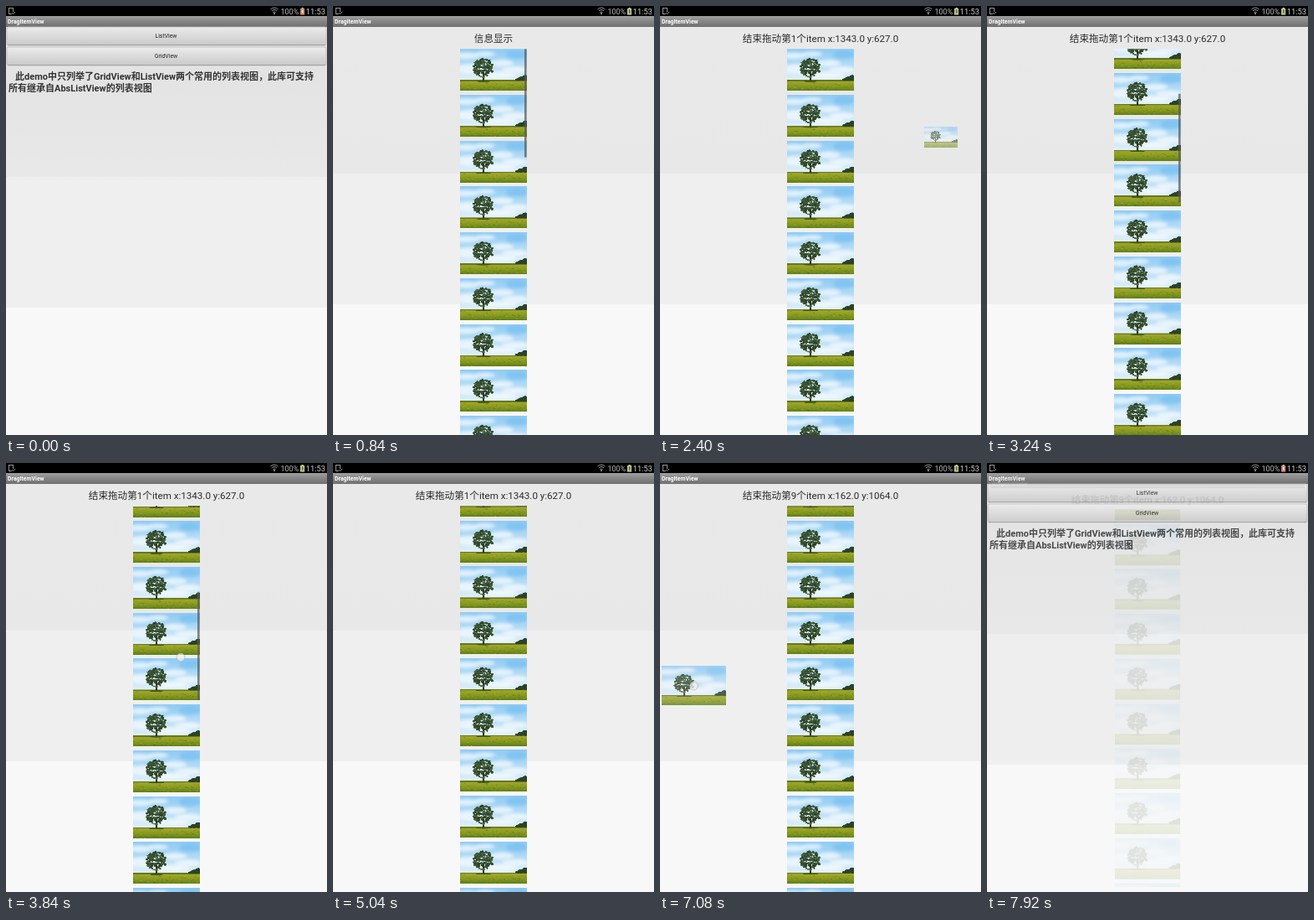
Recreate the animation shown at these times as an HTML page with a canvas. Size 384x512 px, loop 8 s.

```html
<!DOCTYPE html>
<html lang="zh-CN">
<head>
<meta charset="utf-8">
<style>
  html, body { margin: 0; width: 100%; height: 100%; overflow: hidden; background: #000; }
  canvas { display: block; width: 384px; height: 512px; }
</style>
</head>
<body>
<canvas id="stage" width="384" height="512"></canvas>
<script>
const W = 384, H = 512, LOOP = 8000, STEP = 120;
const FONT = 'Roboto, "Noto Sans CJK SC", "Noto Sans CJK", sans-serif';
const ITEM = { x: 152, w: 80, h: 50, pitch: 54.72, count: 30 };
const LIST_TOP = 51.3, LIST_H = H - LIST_TOP;
const ctx = document.getElementById('stage').getContext('2d');

const clamp = v => Math.min(1, Math.max(0, v));
const progress = (t, a, b) => clamp((t - a) / (b - a));
const ease = p => 0.5 - Math.cos(p * Math.PI) / 2;
const mix = (a, b, p) => a + (b - a) * p;

// Eased value along [time, value] pairs
function track(t, keys) {
  for (let i = 1; i < keys.length; i++) {
    const [t0, v0] = keys[i - 1], [t1, v1] = keys[i];
    if (t < t1) return mix(v0, v1, ease(progress(t, t0, t1)));
  }
  return keys[keys.length - 1][1];
}

function makeLayer(w, h, scale = 1) {
  const canvas = document.createElement('canvas');
  canvas.width = w * scale;
  canvas.height = h * scale;
  const c = canvas.getContext('2d');
  c.scale(scale, scale);
  return c;
}

function box(c, x, y, w, h, fill) {
  c.fillStyle = fill;
  c.fillRect(x, y, w, h);
}

function gradient(c, y0, y1, ...colors) {
  const g = c.createLinearGradient(0, y0, 0, y1);
  colors.forEach((color, i) => g.addColorStop(i / (colors.length - 1), color));
  return g;
}

function ellipse(c, x, y, rx, ry, fill) {
  c.fillStyle = fill;
  c.beginPath();
  c.ellipse(x, y, rx, ry, 0, 0, Math.PI * 2);
  c.fill();
}

function text(c, str, x, y, size, color, align = 'left', weight = 400) {
  c.font = `${weight} ${size}px ${FONT}`;
  c.fillStyle = color;
  c.textAlign = align;
  c.fillText(str, x, y);
}

function makePhoto() {
  const c = makeLayer(ITEM.w, ITEM.h, 4);
  let seed = 11;
  const rnd = () => (seed = seed * 16807 % 2147483647) / 2147483647;

  box(c, 0, 0, 80, 50, gradient(c, 0, 38, '#8ecbf4', '#b5dcf6', '#e3f1f8'));
  c.filter = 'blur(8px)';
  [[8, 8, 15, 4], [30, 6, 12, 3], [12, 24, 18, 6], [50, 17, 14, 4],
   [66, 25, 16, 4], [46, 31, 22, 4]].forEach(b => ellipse(c, ...b, 'rgba(246,251,255,.75)'));
  ellipse(c, 68, 7, 13, 5, 'rgba(105,183,240,.5)');
  c.filter = 'none';

  box(c, 0, 37, 80, 2, '#66781f');
  box(c, 0, 38.5, 80, 11.5, gradient(c, 38.5, 50, '#a3a72c', '#889a20', '#60801a'));
  for (let i = 0; i < 90; i++) {
    box(c, rnd() * 80, 39 + rnd() * 11, 2, 0.6, i % 2 ? 'rgba(180,180,40,.35)' : 'rgba(55,90,10,.3)');
  }
  [[69, 36.5, 3, 1.5], [73, 35.5, 4, 2.5], [78, 34.5, 4, 3.5]]
    .forEach(b => ellipse(c, ...b, '#2c4228'));

  box(c, 27, 26, 1.8, 13, '#30301c');
  ellipse(c, 28, 38.6, 9, 0.8, '#45581a');
  for (let i = 0; i < 130; i++) {
    const a = rnd() * Math.PI * 2, r = Math.sqrt(rnd());
    ellipse(c, 28 + Math.cos(a) * r * 12, 22.5 + Math.sin(a) * r * 11,
      0.8 + rnd() * 1.3, 0.7 + rnd() * 1, ['#2d432b', '#39502f', '#4a6038'][i % 3]);
  }
  return c.canvas;
}

const photo = makePhoto();
const listLayer = makeLayer(W, H);

const drags = [
  { n: 1, start: 1400, move: 2160, drop: 2250, from: [192, 76.5], to: [335.75, 156.75] },
  { n: 9, start: 5820, move: 6900, drop: 7040, from: [192, 148.5], to: [40.5, 266] }
];
const FINGER_SCROLLS = [[2740, 3080, 430, 260], [3320, 3800, 400, 232]];

function scrollAt(t) {
  return track(t, [[2740, 0], [3080, 170], [3320, 197], [3800, 365], [4300, 365.6]]);
}

function dragPoint(d, t) {
  const p = ease(progress(t, d.start, d.move));
  return d.from.map((v, i) => mix(v, d.to[i], p));
}

function message(t) {
  const d = drags.filter(d => t >= d.start).pop();
  if (!d) return '信息显示';
  const [x, y] = dragPoint(d, t).map(v => Math.round(v * 4).toFixed(1));
  return `${t < d.drop ? '正在' : '结束'}拖动第${d.n}个item x:${x} y:${y}`;
}

function titleBar(c) {
  box(c, 0, 12, W, 13, gradient(c, 12, 25, '#a0a0a0', '#858585', '#707070'));
  text(c, 'DragItemView', 2, 21, 6.9, '#fff', 'left', 700);
}

function background(c, first, second, top) {
  box(c, 0, 0, W, first, gradient(c, 24, first, top, '#e8e8e8'));
  box(c, 0, first, W, second - first, '#efefef');
  box(c, 0, second, W, H - second, '#f8f8f8');
}

function button(c, label, y) {
  c.beginPath();
  c.roundRect(1, y, 382, 22, 2);
  c.fillStyle = gradient(c, y, y + 22, '#ececec', '#dadada', '#c9c9c9');
  c.fill();
  c.strokeStyle = '#bcbcbc';
  c.lineWidth = 0.8;
  c.stroke();
  box(c, 2, y + 21, 380, 1, '#a2a2a2');
  text(c, label, 191.5, y + 13.3, 6.9, '#222', 'center');
}

function drawMain(c) {
  background(c, 204, 360, '#e1e1e1');
  titleBar(c);
  button(c, 'ListView', 25);
  button(c, 'GridView', 49);
  text(c, '此demo中只列举了GridView和ListView两个常用的列表视图，此库可支持', 11, 88, 11, '#333', 'left', 700);
  text(c, '所有继承自AbsListView的列表视图', 3, 102, 11, '#333', 'left', 700);
}

function drawList(c, t) {
  background(c, 200, 356, '#e9e9e9');
  titleBar(c);
  text(c, message(t), 192, 42.5, 11.6, '#2b2b2b', 'center');

  const scroll = scrollAt(t);
  c.save();
  c.beginPath();
  c.rect(0, LIST_TOP, W, LIST_H);
  c.clip();
  for (let i = 0; i < ITEM.count; i++) {
    const y = LIST_TOP + i * ITEM.pitch - scroll;
    if (y > -ITEM.h && y < H) c.drawImage(photo, ITEM.x, y, ITEM.w, ITEM.h);
  }
  const bar = t < 2600 ? 1 - progress(t, 1000, 1250)
    : t >= 2760 ? 1 - progress(t, 4260, 4500) : 0;
  const content = ITEM.count * ITEM.pitch;
  c.globalAlpha = bar;
  box(c, 229, LIST_TOP + scroll / content * LIST_H, 2.6, LIST_H * LIST_H / content, 'rgba(90,90,90,.75)');
  c.restore();

  for (const d of drags) {
    const size = 1 - ease(progress(t, d.drop, d.drop + 300));
    if (t < d.start || size <= 0) continue;
    const [x, y] = dragPoint(d, t), w = ITEM.w * size, h = ITEM.h * size;
    c.globalAlpha = 0.25 + 0.6 * size;
    c.drawImage(photo, x - w / 2, y - h / 2 - 0.5, w, h);
    c.globalAlpha = 1;
  }
}

function drawStatus(c, listShown) {
  box(c, 0, 0, W, 12, '#000');
  c.strokeStyle = '#a5a5a5';
  c.lineWidth = 0.9;
  c.strokeRect(3.5, 2.5, 5, 7);
  box(c, 7, 7, 3, 3, '#000');
  c.beginPath();
  c.moveTo(7, 8);
  c.lineTo(8.5, 9.5);
  c.lineTo(11, 7);
  c.stroke();

  for (const r of [2.5, 5, 7.2]) {
    c.beginPath();
    c.arc(321, 9.5, r, -Math.PI * 0.72, -Math.PI * 0.28);
    c.stroke();
  }
  ellipse(c, 321, 9, 1, 1, '#a5a5a5');
  text(c, '100%', 328.5, 9.6, 9, '#b8b8b8');
  box(c, 353.5, 2, 2.4, 1.2, '#c8c8c8');
  box(c, 352, 3, 5.2, 7.6, listShown ? '#b9c48b' : '#c9866d');
  box(c, 354, 4.5, 1.4, 4, listShown ? '#56652d' : '#eee');
  text(c, '11:53', 382, 9.8, 9.4, '#d0d0d0', 'right');
}

function touchPoint(t) {
  if (t >= 120 && t < 480) return [239, 33];
  for (const d of drags) {
    if (t >= d.start - 500 && t < d.drop + 60) return dragPoint(d, t);
  }
  for (const [a, b, y0, y1] of FINGER_SCROLLS) {
    if (t >= a - 40 && t < b + 60) return [209, mix(y0, y1, ease(progress(t, a, b)))];
  }
  return null;
}

function drawTouch(c, t) {
  const point = touchPoint(t);
  if (!point) return;
  ellipse(c, ...point, 5, 5, 'rgba(240,240,240,.72)');
  c.strokeStyle = 'rgba(150,150,150,.6)';
  c.lineWidth = 0.8;
  c.stroke();
}

function render(t) {
  const opening = ease(progress(t, 300, 660)), closing = progress(t, 7620, 7960);
  const alpha = opening * (1 - closing);
  if (alpha < 1) drawMain(ctx);
  if (alpha > 0) {
    drawList(listLayer, t);
    const scale = mix(0.92, 1, opening) - 0.025 * closing;
    ctx.save();
    ctx.globalAlpha = alpha;
    ctx.translate(W / 2, H / 2);
    ctx.scale(scale, scale);
    ctx.drawImage(listLayer.canvas, 0, 12, W, H - 12, -W / 2, 12 - H / 2, W, H - 12);
    ctx.restore();
  }
  drawStatus(ctx, alpha > 0.5);
  drawTouch(ctx, t);
}

const began = performance.now();
function tick() {
  const t = (performance.now() - began) % LOOP;
  render(Math.floor(t / STEP) * STEP);
  requestAnimationFrame(tick);
}
tick();
</script>
</body>
</html>
```
